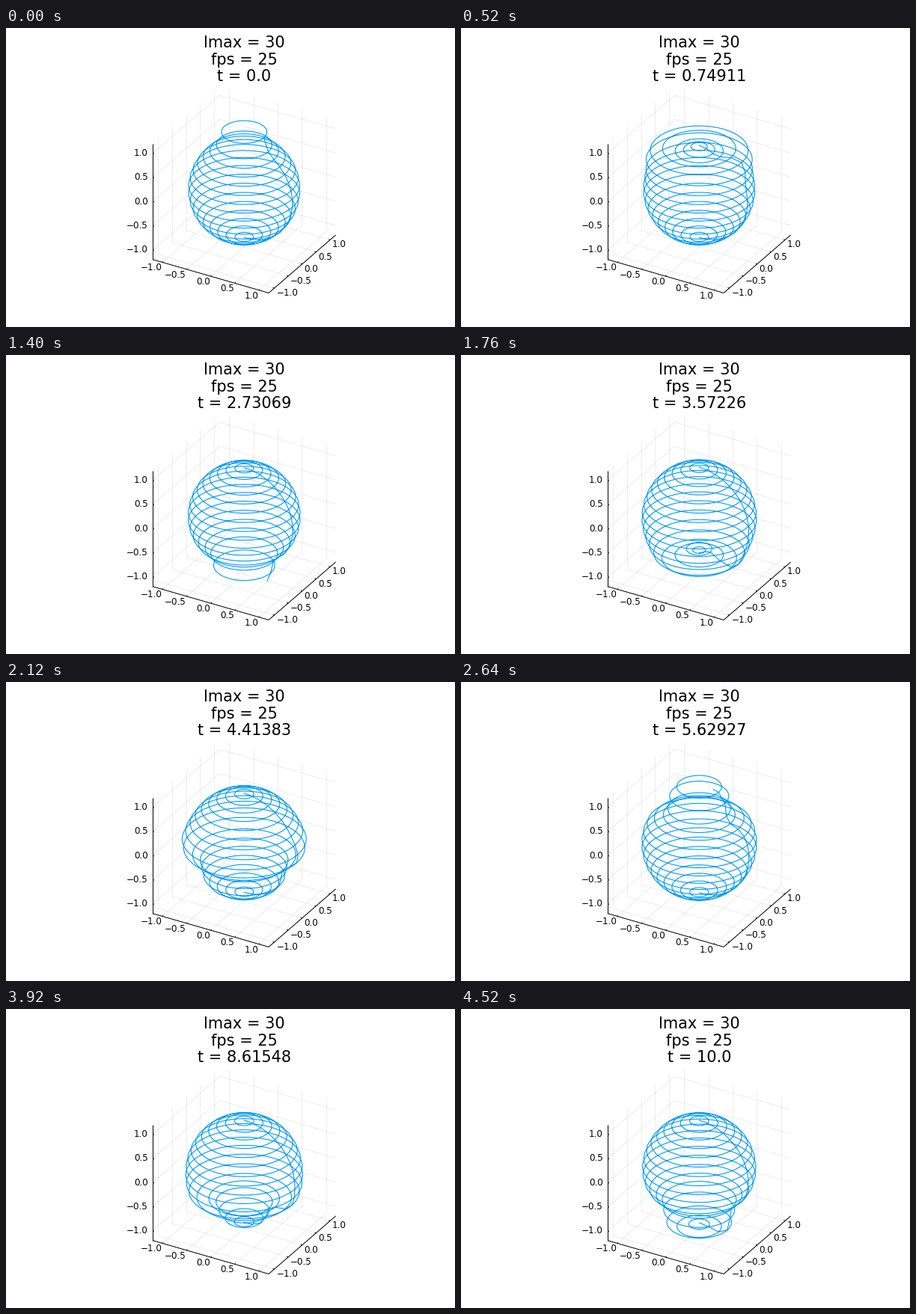
Write a matplotlib script that moves like this. It is 600 px wide and 400 px high and loops after 4.56 s.

```python
import numpy as np
import matplotlib.pyplot as plt
from matplotlib.animation import FuncAnimation
from numpy.polynomial.legendre import leggauss, legvander

W, H, DPI = 600, 400, 100
PX = 72 / DPI
FRAMES, INTERVAL = 114, 40
LMAX, FPS = 30, 25
LIM = 1.2
TICKS = (-1.0, -0.5, 0.0, 0.5, 1.0)
CENTER, SCALE = (318.3, 215.8), 74.6
C30, S30 = np.cos(np.pi / 6), 0.5

plt.rcParams["font.family"] = "DejaVu Sans"
fig = plt.figure(figsize=(W / DPI, H / DPI), dpi=DPI, facecolor="white")
ax = fig.add_axes([0, 0, 1, 1])
ax.set_xlim(0, W)
ax.set_ylim(H, 0)
ax.axis("off")


def project(x, y, z):
    """Orthographic view at azimuth 30 and elevation 30, in pixels."""
    right = C30 * x + S30 * y
    down = S30 * (S30 * x - C30 * y) - C30 * z
    return CENTER[0] + SCALE * right, CENTER[1] + SCALE * down


def segment(a, b, width=1.0, **style):
    xs, ys = zip(project(*a), project(*b))
    ax.plot(xs, ys, lw=width * PX, solid_capstyle="butt", **style)


def label(x, y, text, size=11.94, **align):
    return ax.text(x, y, text, fontsize=size * PX, color="black", **align)


def tick_label(point, dx, dy, value, ha):
    x, y = project(*point)
    text = f"{value:.1f}".replace("-", "\u2212")
    label(x + dx, y + dy, text, ha=ha, va="center")


def draw_box():
    grid = dict(width=0.7, color="black", alpha=0.1, zorder=1)
    axis = dict(color="black", zorder=2)
    tick = 0.03
    for v in TICKS:
        segment((v, -LIM, -LIM), (v, LIM, -LIM), **grid)
        segment((v, LIM, -LIM), (v, LIM, LIM), **grid)
        segment((-LIM, v, -LIM), (LIM, v, -LIM), **grid)
        segment((-LIM, v, -LIM), (-LIM, v, LIM), **grid)
        segment((-LIM, -LIM, v), (-LIM, LIM, v), **grid)
        segment((-LIM, LIM, v), (LIM, LIM, v), **grid)

        segment((v, -LIM, -LIM), (v, -LIM + tick, -LIM), **axis)
        segment((LIM, v, -LIM), (LIM - tick, v, -LIM), **axis)
        segment((-LIM, -LIM, v), (-LIM + tick, -LIM, v), **axis)

        tick_label((v, -LIM, -LIM), -0.5, 7.5, v, "right")
        tick_label((LIM, v, -LIM), 2.8, 6.5, v, "left")
        tick_label((-LIM, -LIM, v), -6.3, 0, v, "right")
    segment((-LIM, -LIM, -LIM), (LIM, -LIM, -LIM), **axis)
    segment((LIM, -LIM, -LIM), (LIM, LIM, -LIM), **axis)
    segment((-LIM, -LIM, -LIM), (-LIM, -LIM, LIM), **axis)


# Legendre spectrum of a Gaussian bump on the north pole
degrees = np.arange(LMAX + 1)
nodes, weights = leggauss(200)
bump = np.exp(-0.5 * (np.arccos(nodes) / 0.2) ** 2)
coeffs = (degrees + 0.5) * (legvander(nodes, LMAX).T @ (weights * bump))
omega = np.sqrt(degrees * (degrees + 1))

theta = np.linspace(0, np.pi, 20)
phi = np.linspace(0, 2 * np.pi, 61)
basis = legvander(np.cos(theta), LMAX)
coarse = np.arange(theta.size * phi.size)
fine = np.linspace(0, coarse[-1], coarse[-1] * 16 + 1)


def ramp(n):
    return n - 5.89 * (1 - np.exp(-n / 7))


def sim_time(n):
    """Solver time: step size grows at the start, then is nearly constant."""
    if n < 24:
        return 1.70738 * ramp(n) / ramp(24)
    return np.interp(n, (24, 35, 53, 81, 98, 113),
                     (1.70738, 2.73069, 4.41383, 7.0317, 8.61548, 10.0))


def surface_path(t):
    radius = 1 + basis @ (coeffs * np.cos(omega * t))
    ring = radius * np.sin(theta)
    points = (np.outer(ring, np.cos(phi)),
              np.outer(ring, np.sin(phi)),
              np.outer(radius * np.cos(theta), np.ones_like(phi)))
    x, y, z = (np.interp(fine, coarse, p.ravel()) for p in points)
    z[np.abs(z) > LIM] = np.nan
    return project(x, y, z)


draw_box()
title = dict(size=20.9, ha="center", va="baseline")
label(318.3, 26.0, f"lmax = {LMAX}", **title)
label(318.3, 48.7, f"fps = {FPS}", **title)
clock = label(318.3, 71.4, "", **title)
curve, = ax.plot([], [], color="#009afa", lw=1.1 * PX, zorder=3,
                 solid_joinstyle="round")


def update(n):
    t = float(sim_time(n))
    curve.set_data(*surface_path(t))
    clock.set_text(f"t = {round(t, 5)}")
    return curve, clock


anim = FuncAnimation(fig, update, frames=FRAMES, interval=INTERVAL,
                     repeat=True, repeat_delay=0, blit=False)
plt.show()
```
